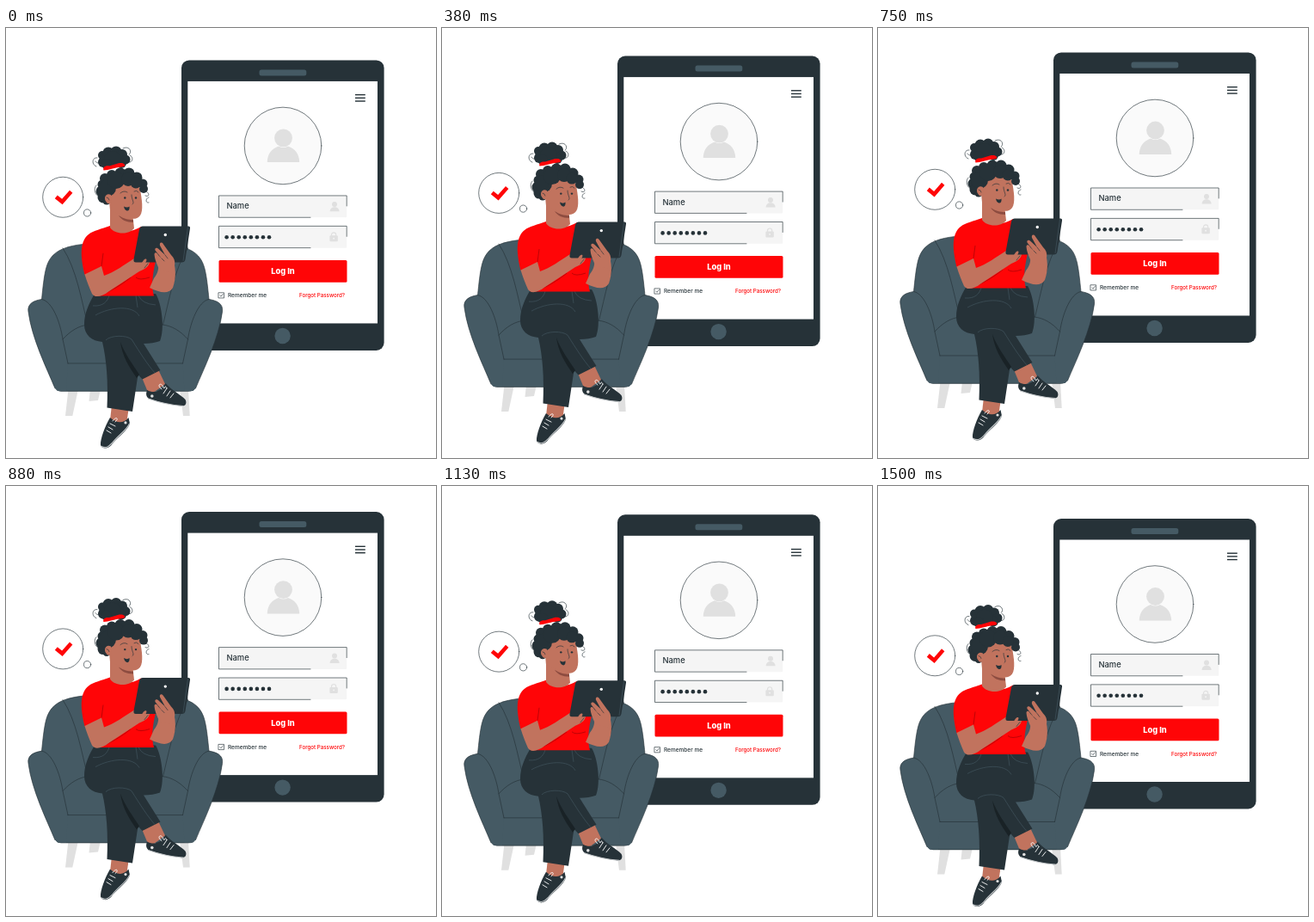
These frames come from a looping animation (500 px wide and 500 px high, 1540 ms). An HTML page:

```html
<!DOCTYPE html>
<html lang="en">
<head>
<meta charset="utf-8">
<title>Log in</title>
<style>
html, body { margin: 0; width: 100%; height: 100%; overflow: hidden; background: #fff; }
svg { display: block; width: 500px; height: 500px; }
text { font-family: Inter, "Open Sans", sans-serif; font-weight: 500; fill: #263238; }
.dark { fill: #263238; }
.slate { fill: #455a64; }
.red { fill: #ff0507; }
.skin { fill: #c1735e; }
.pale { fill: #e0e0e0; }
.line { fill: none; stroke: #263238; stroke-width: .65; stroke-linecap: round; stroke-linejoin: round; }
.seam { fill: none; stroke: #455a64; stroke-width: .6; }
.lace { fill: none; stroke: #fff; stroke-width: .9; stroke-linecap: round; }
.sole { fill: none; stroke: #c4c8ca; stroke-width: 1.1; stroke-linecap: round; }
.fold { fill: none; stroke: #a30307; stroke-width: .7; }
</style>
</head>
<body>
<svg viewBox="0 0 500 500"><g id="scene"></g></svg>
<script>
const path = (cls, d) => `<path class="${cls}" d="${d}"/>`;
const dot = (cls, x, y, r) => `<circle class="${cls}" cx="${x}" cy="${y}" r="${r}"/>`;
const box = (cls, x, y, w, h, r = 0) =>
  `<rect class="${cls}" x="${x}" y="${y}" width="${w}" height="${h}" rx="${r}"/>`;
const text = (x, y, size, str, extra = '') =>
  `<text x="${x}" y="${y}" font-size="${size}" ${extra}>${str}</text>`;
const dots = (cls, list) => list.map(c => dot(cls, ...c)).join('');

const field = y =>
  `<rect x="247.5" y="${y}" width="148.7" height="25.3" rx="1" fill="#f5f5f5"/>` +
  path('line', `M354 ${y + 25.3}H247.5V${y}H396.2V${y + 12}`);

function device() {
  const password = Array.from({ length: 8 }, (_, i) => [256.6 + i * 7.06, 243.3, 2.3]);
  return box('dark', 204, 37.5, 235.6, 337.5, 9) +
    '<rect x="211.3" y="62" width="220.7" height="281.5" fill="#fff"/>' +
    box('slate', 294.5, 48.5, 54.8, 7, 2.5) + dot('slate', 321.6, 358, 9.2) +
    [77.7, 81.4, 85.1].map(y => box('dark', 406, y - .7, 11.8, 1.4)).join('') +
    '<circle cx="322" cy="137" r="44.8" fill="#fafafa"/>' + dot('line', 322, 137, 44.8) +
    dot('pale', 322.5, 128, 10.4) +
    path('pale', 'M303.8 156C303.8 147 309 140 317 137.5Q322.5 140.5 328 137.5C336 140 341.2 147 341.2 156Z') +
    field(195) + text(256.4, 210.5, 9.4, 'Name') +
    dot('pale', 382, 205, 3) +
    path('pale', 'M376.6 213.4C377 209.5 379 208.4 382 208.2C385 208.4 387.3 209.5 387.6 213.4Z') +
    field(230.4) + dots('dark', password) +
    box('pale', 376.4, 241.3, 9.4, 7, 1) +
    '<path d="M378.5 242V240.5A2.6 2.6 0 0 1 383.7 240.5V242" fill="none" stroke="#e0e0e0" stroke-width="1.2"/>' +
    '<circle cx="381.1" cy="244.7" r=".9" fill="#f5f5f5"/>' +
    box('red', 247.5, 270, 149, 25.7, 1.5) +
    text(322, 286.2, 9.3, 'Log In', 'text-anchor="middle" style="fill:#fff;font-weight:800"') +
    box('line', 247.3, 307.8, 6.2, 6.2) +
    path('line', 'M248.8 311L250 312.2L252.2 309.4') +
    text(258, 313.2, 6.5, 'Remember me') +
    text(341, 313.2, 6.2, 'Forgot Password?', 'style="fill:#ff0507"');
}

function bubble() {
  return dot('line', 66.2, 196.8, 23.5) + dot('line', 94.6, 215, 4.1) +
    path('red', 'M56.8 198.2L59.8 194.6L65.1 198.9L74 188.8L77.4 191.8L65.6 205.4Z');
}

function chair() {
  const arm = 'M57 419C47 395 30 361 26 330C24.500 320 33 317 41.500 315.500C54 318 63 342 66 362L72 390';
  const side = path('slate', arm + 'L70 422H60Z') + path('line', arm) +
    path('line', 'M41.500 315.500C43 301 44 291 46 282C50 264 60 254 94 251M66 362C75 352 85 346 96 345M72 390H120M66 256C82 280 88 318 95 345');
  return path('pale', 'M72.5 420H84L77.3 451H69Z') +
    path('pale', 'M98 420H110L107 433L96.5 434Z') +
    path('pale', 'M202 420H212L213.7 451H206Z') +
    path('slate', 'M41.500 316C43 301 44 291 46 282C50 264 60 254 94 251H183.500C217.500 254 227.500 264 231.500 282C233.500 291 234.500 301 236 316L219 420Q217 422.500 212 422.500H64Q59 422.500 57 418Z') +
    path('line', 'M58 419Q59 422.3 64 422.3H212Q218 422.3 219.5 419') +
    side + `<g transform="translate(277.5) scale(-1 1)">${side}</g>`;
}

function legs() {
  return path('skin', 'M123 438L143 440L140 461L121 456Z') +
    path('skin', 'M157 404L176 395L185 414L170 425L164 421Z') +
    path('dark', 'M121 453C115 463 109.500 478 110 485C112 490.500 120 489.500 124 483C132 474 141 468 144 460L142.500 453C136 461 128 459 121 453Z') +
    path('sole', 'M111 486.500C117 490 121 485 124 482C131 473 140 468 143.500 460') +
    path('lace', 'M121 460L127 463M119 464L124 467M117 468L122 471M124 457C128 451 132 454 127 458') +
    dot('pale', 139, 459, 1.6) +
    path('dark', 'M164 421C173 426 182 421 185.500 413C192 421 203 426 208.500 432C211 437 208 440.500 203 439.500C190 438 175 434.500 166 431C162 428 163 424 164 421Z') +
    path('sole', 'M165.500 431C178 435.500 192 438.500 206 439.500') +
    path('lace', 'M183 425L187 419M187 428L191 422M191 430L195 425M181 420C174 415 181 411 183 418C185 422 184 413 187 419') +
    dot('pale', 169.800, 428, 1.8) +
    path('dark', 'M103 309H174C181 320 185 350 179 364Q171 367 160 367L179.500 398L158.500 408.500L153.500 403L147 446L117.500 441.500C119 412 117 386 112 365C100 364 91 357 91 345C91 332 96 321 103 309Z') +
    '<path d="M133 365C138 379 148 392 155 403L152 407C143 394 135 381 133 365Z" fill="#192226"/>' +
    path('seam', 'M101 323C113 324 118 318 120 311M154 311Q158 321 174 322M104 334C122 324 148 322 155 335M116 363C122 357 140 357 146 362C156 378 165 392 173 401M151 311L153 325');
}

function body() {
  return path('red', 'M121 230C111 234 102 235 96 240C86 248 86 264 91.500 287L108 281L103 311.500H172C169 301 170 288 174 271L171 238L157 231Q139 242 121 230Z') +
    path('skin', 'M121 205V232C126 240 142 241 149 233L147 215Z') +
    '<path d="M131 218C137 222 142 223 148 223L148 226C140 226 134 223 131 218Z" fill="#8d4c40"/>' +
    path('fold', 'M111 277L113 262M167 290Q155 294 151 290M108 311C122 306 134 299 145 290') +
    path('skin', 'M91.500 286.500L111 277L114 288C126 284 138 275 149 268L167 269C168 276 163 280 155 283L120 306C111 313 103 314 100 309C97 302 94 295 91.500 286.500Z') +
    path('skin', 'M172 291C177 285 178 279 177 271L193 265C198 278 198 291 194 302C189 310 179 308 167 302Z') +
    path('dark', 'M159 230.500H212Q214.500 230.500 214 233L208.500 269Q208 272.500 204 272.500H151Q148 272.500 148.500 269L155 234Q156 230.500 159 230.500Z') +
    path('seam', 'M211.500 231.500L206 271') +
    '<circle cx="185.300" cy="240.500" r="1.700" fill="#fff"/>' +
    path('skin', 'M179 282C175 274 173 269 172.500 263C173 260 176 261 177 264L181 268L173.500 258.500C172.500 255 176 255 178 257.500L185 264L179 253C178 249 181.500 248.500 183 251.500L192 264C199 270 196 279 193 285Z') +
    path('skin', 'M153 280L160 270C163 267 165 269 162 273L161 280Z') +
    path('line', 'M161 279L165 274M181 268L184 271M185 264L188 268');
}

function head() {
  const bun = [[113, 156, 6], [112, 148, 5], [119, 145, 6.500], [128, 144, 6.500], [135, 147, 6],
    [139, 153, 5.500], [134, 157, 6], [124, 153, 10], [117, 158, 6]];
  const hair = [[115, 175, 6], [123, 171, 6], [133, 169, 6.500], [143, 169, 6.500], [152, 174, 6.500],
    [159, 181, 5.500], [160, 187, 5], [112, 182, 5.500], [111, 190, 6.500], [113, 197, 6.500],
    [118, 186, 10], [128, 177, 10], [142, 176, 8], [151, 180, 6.500], [117, 201, 4.500]];
  return path('skin', 'M119 190C126 174 153 174 156 188C158 199 160 212 156 218C152 224 143 222 136 219L121 212Z') +
    dots('dark', bun) + dots('dark', hair) +
    path('red', 'M113.500 165.500C112 162 116 160 120 160.500L130 157.500C135 156 140 158 137.500 161L128 162.500L118 165Z') +
    path('skin', 'M122 194C116 191 113 198 116.500 202C118 205 121 205 123 202Z') +
    path('line', 'M117 197Q119.500 197 120 200M133 192Q137 188.500 141 191M149 190Q152 188 154 191M146 194C146 200 150 203 147 205') +
    dot('dark', 138.300, 197.500, 1.200) + dot('dark', 151, 197.500, 1.200) +
    path('dark', 'M137 207.500C139.500 209 142 209 143.500 207.500C144 211 142.500 213 140.500 212.500C138.500 212 137.500 210 137 207.500Z') +
    path('line', 'M105 161C99 159 100 150 106 151M104 155C106 158 109 158 109 153M136 140C144 136 147 145 143 147M144 148C149 150 147 157 143 156M105 183C101 187 104 195 108 196M163 190C168 193 166 197 162 195M166 197C162 198 162 204 166 203');
}

const scene = document.getElementById('scene');
scene.innerHTML = device() + bubble() + chair() + legs() + body() + head();

// A steady 10 px rise and fall, held on 37 poses per loop.
const LOOP = 1540, STEP = LOOP / 37, PEAK = 720, TOP = -9.4, TRAVEL = 10;
function draw() {
  const now = performance.now() % LOOP;
  const t = Math.floor((now + 5) / STEP) * STEP;
  const away = Math.abs(t - PEAK);
  const y = TOP + TRAVEL * Math.min(away, LOOP - away) / (LOOP / 2);
  scene.setAttribute('transform', `translate(0 ${y.toFixed(2)})`);
  requestAnimationFrame(draw);
}
draw();
</script>
</body>
</html>
```
